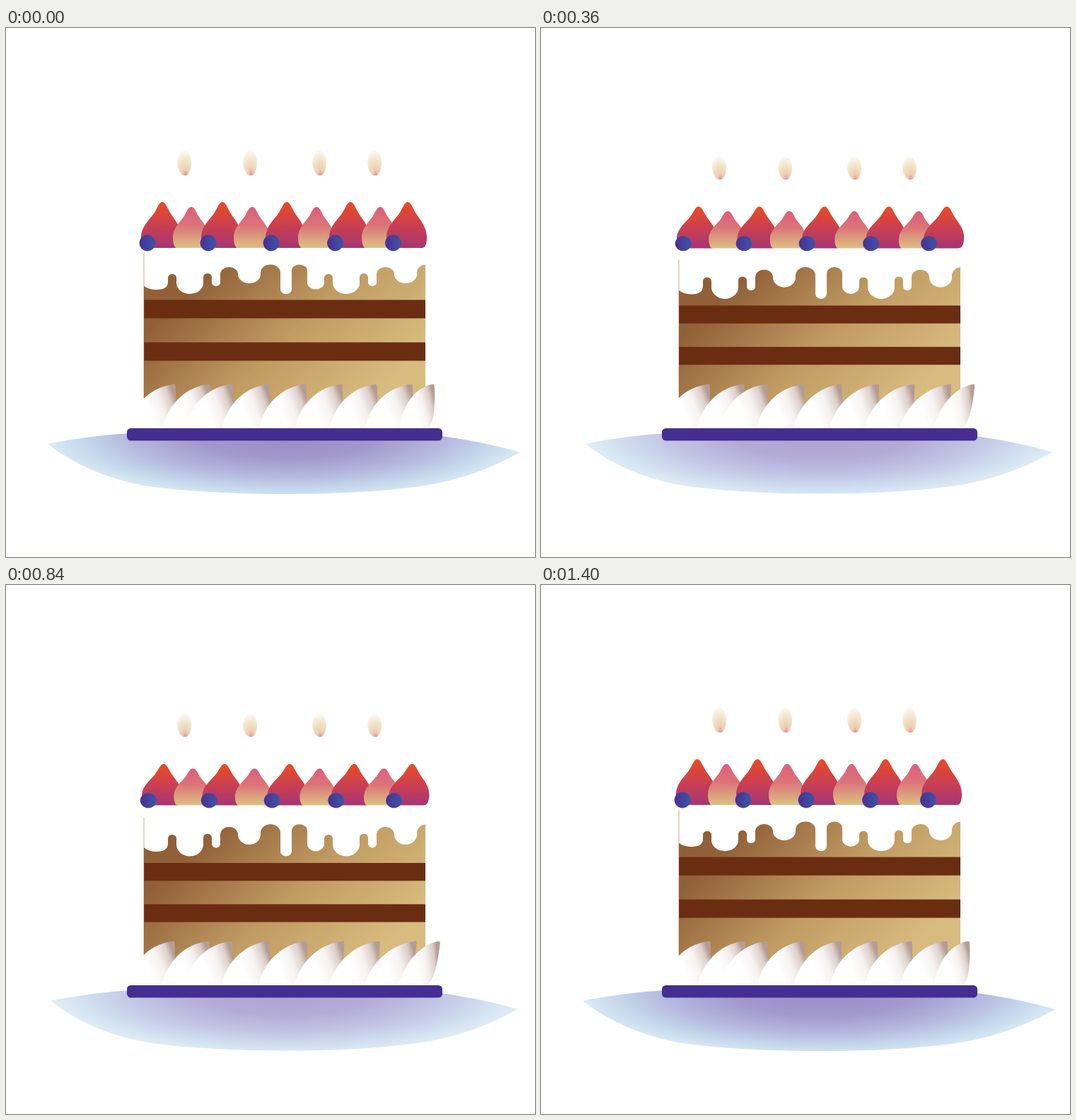
These frames come from a looping animation (748x748 px, 1440 ms). An HTML page:

```html
<!DOCTYPE html>
<html lang="en">
<head>
<meta charset="utf-8">
<title>Birthday cake</title>
<style>
  html, body { margin: 0; width: 100%; height: 100%; overflow: hidden; background: #fff; }
  svg { display: block; width: 100%; height: 100%; }
</style>
</head>
<body>
<svg id="stage" viewBox="0 0 748 748">
  <defs>
    <radialGradient id="glow" gradientUnits="userSpaceOnUse" cx="0" cy="0" r="1"
      gradientTransform="translate(398 574) scale(345 92)">
      <stop offset="0" stop-color="#9a8bc6"/>
      <stop offset=".38" stop-color="#a298cc"/>
      <stop offset=".65" stop-color="#b5b8de"/>
      <stop offset=".85" stop-color="#c5d8ec"/>
      <stop offset="1" stop-color="#d9ebf4"/>
    </radialGradient>
    <linearGradient id="sponge" gradientUnits="userSpaceOnUse" x1="260" y1="370" x2="465" y2="575">
      <stop offset="0" stop-color="#916038"/>
      <stop offset=".5" stop-color="#c09b62"/>
      <stop offset="1" stop-color="#d8bb7f"/>
    </linearGradient>
    <linearGradient id="red" x2="0" y2="1">
      <stop offset="0" stop-color="#ea4b25"/>
      <stop offset=".5" stop-color="#cb4050"/>
      <stop offset="1" stop-color="#a63574"/>
    </linearGradient>
    <linearGradient id="pink" x2="0" y2="1">
      <stop offset="0" stop-color="#dc5f7b"/>
      <stop offset=".45" stop-color="#dc7479"/>
      <stop offset="1" stop-color="#dcc182"/>
    </linearGradient>
    <linearGradient id="blue">
      <stop offset="0" stop-color="#4a3092"/>
      <stop offset="1" stop-color="#3b55a6"/>
    </linearGradient>
    <linearGradient id="cream" x1=".45" y1=".62" x2="1.02" y2=".42">
      <stop offset="0" stop-color="#fff"/>
      <stop offset=".45" stop-color="#f6f2f1"/>
      <stop offset=".8" stop-color="#dccfca"/>
      <stop offset="1" stop-color="#b59c93"/>
    </linearGradient>
    <radialGradient id="fire" cx=".58" cy=".98" r=".95">
      <stop offset="0" stop-color="#e2675c" stop-opacity=".75"/>
      <stop offset=".22" stop-color="#dfa072" stop-opacity=".55"/>
      <stop offset=".6" stop-color="#dcbb78" stop-opacity=".42"/>
      <stop offset="1" stop-color="#dcb878" stop-opacity=".1"/>
    </radialGradient>
  </defs>
</svg>
<script>
const stage = document.getElementById('stage');
const LOOP = 1440, STEP = 40, PEAK = 600;
const movers = [];

function add(tag, attrs, move) {
  const el = document.createElementNS('http://www.w3.org/2000/svg', tag);
  for (const k in attrs) el.setAttribute(k, attrs[k]);
  stage.append(el);
  if (move) movers.push(p => el.setAttribute('transform', `matrix(${move(p)})`));
  return el;
}

// Vertical scale about y0, with a sideways lean per unit of height
const lean = (y0, sy, skew = 0, dx = 0, dy = 0) =>
  [1, 0, -skew, sy, skew * y0 + dx, y0 * (1 - sy) + dy];

// Shadow under the plate
const shadow = add('path', {
  d: 'M59 588Q120 576 175 573L616 577Q680 586 727 600Q668 633 600 646Q515 659 400 659' +
     'Q275 659 195 647Q115 632 59 588Z',
  fill: 'url(#glow)'
}, p => [1 - .014 * p, 0, 0, 1 - .008 * p, 5.8 * p, 4.6 * p]);
movers.push(p => shadow.setAttribute('opacity', 1 - .25 * p));

// Sponge and chocolate layers
const body = p => lean(384.5, 1 - .036 * p, 0, 0, 10.9 * p);
add('rect', { x: 195, y: 318, width: 398, height: 248, fill: 'url(#sponge)' }, body);
for (const y of [384.5, 444.5])
  add('rect', { x: 195, y, width: 398, height: 26, fill: '#6b2d12' }, body);

// Icing: lobes of [width, extreme y] alternate up and down, and the pattern repeats
const lobes = [[12, 348], [38, 376], [12, 347], [12, 365], [25, 338],
  [32, 361], [28, 334.5], [16, 376], [22, 334.5], [24, 369.5]];
let drip = 'M194 312V364Q201 370 213 370Q229 370 229 359';
for (let i = 0, x = 229; x < 594; i++) {
  const [w, y] = lobes[i % lobes.length];
  const down = i % 2, rx = w / 2, ry = w * .4;
  const side = y + (down ? -ry : ry);
  const arc = `A${rx} ${ry} 0 0 ${1 - down} `;
  drip += `L${x} ${side}${arc}${x + rx} ${y}${arc}${x + w} ${side}`;
  x += w;
}
add('path', { d: drip + 'V312Z', fill: '#fff' }, p => lean(295, 1 + .118 * p));
add('rect', { x: 194.5, y: 318, width: 1, height: 214, fill: '#8f6038', opacity: .5 }, body);

// Strawberries, red and pink in turn
const redPath = 'M0 246C4 246 6 252 10 259C15 269 27 279 27 296Q27 311 20 311H-23' +
  'Q-30 311 -30 296C-30 279 -15 269 -10 259C-6 252 -4 246 0 246Z';
const pinkPath = 'M0 253C4 253 6 258 9 264C14 273 25 281 25 297Q25 311 18 311H-22' +
  'Q-26 306 -26 297C-26 281 -14 273 -9 264C-6 258 -4 253 0 253Z';
[221, 262, 306, 348, 397, 439, 487, 529, 568].forEach((x, i) => {
  const d = 2.5 + .7 * i;
  add('path', { d: i % 2 ? pinkPath : redPath, fill: `url(#${i % 2 ? 'pink' : 'red'})` },
    p => lean(311, 1 - .13 * p, .6 * d * p / 65, x + .4 * d * p, .6 * p));
});

// Blueberries
for (const x of [200, 286, 375, 465.5, 547.5])
  add('circle', { cx: 0, cy: 304, r: 11.4, fill: 'url(#blue)' },
    p => [1, 0, 0, 1 - .1 * p, x + 1.5 * p, 31.4 * p]);

// Flames
for (const x of [252, 345, 443, 521])
  add('path', {
    d: 'M0 173C7 173 10 184 10 190C10 198 7 208 3 208.5H-1' +
       'C-6 207 -10 197 -10 190C-10 183 -6 173 0 173Z',
    fill: 'url(#fire)'
  }, p => lean(208.5, 1 - .11 * p, 0, x, 8 * p));

// Whipped cream, leaning further towards the right end
[173, 222, 254, 306, 358, 409, 458, 508, 556].forEach((x, i, all) => {
  const w = i < all.length - 1 ? 66 : 49;
  const d = 12 * (i / 8) ** 2;
  add('path', {
    d: `M0 566C${w * .08} 536 ${w * .43} 508 ${w - 1} 503.5` +
       `Q${w + 1} 503 ${w + 1} 510C${w + 2} 535 ${w} 566 ${w - 11} 566Z`,
    fill: 'url(#cream)'
  }, p => lean(566, 1, d * p / 62, x - 1.5 * p));
});

// Plate
add('rect', { x: 171, y: 566, width: 446, height: 17.5, rx: 5.5, fill: '#452e91' });

// Quick squash, then a softer return
function squash(t) {
  if (t < PEAK) return Math.sin(Math.PI / 2 * t / PEAK) ** 1.5;
  const v = (t - PEAK) / (LOOP - PEAK);
  return 1 - .2 * v - .8 * v * v * (3 - 2 * v);
}

const start = performance.now();
function draw(now) {
  const t = Math.max(0, now - start) % LOOP;
  const p = squash(Math.floor(t / STEP) * STEP);
  movers.forEach(move => move(p));
  requestAnimationFrame(draw);
}
draw(start);
</script>
</body>
</html>
```
